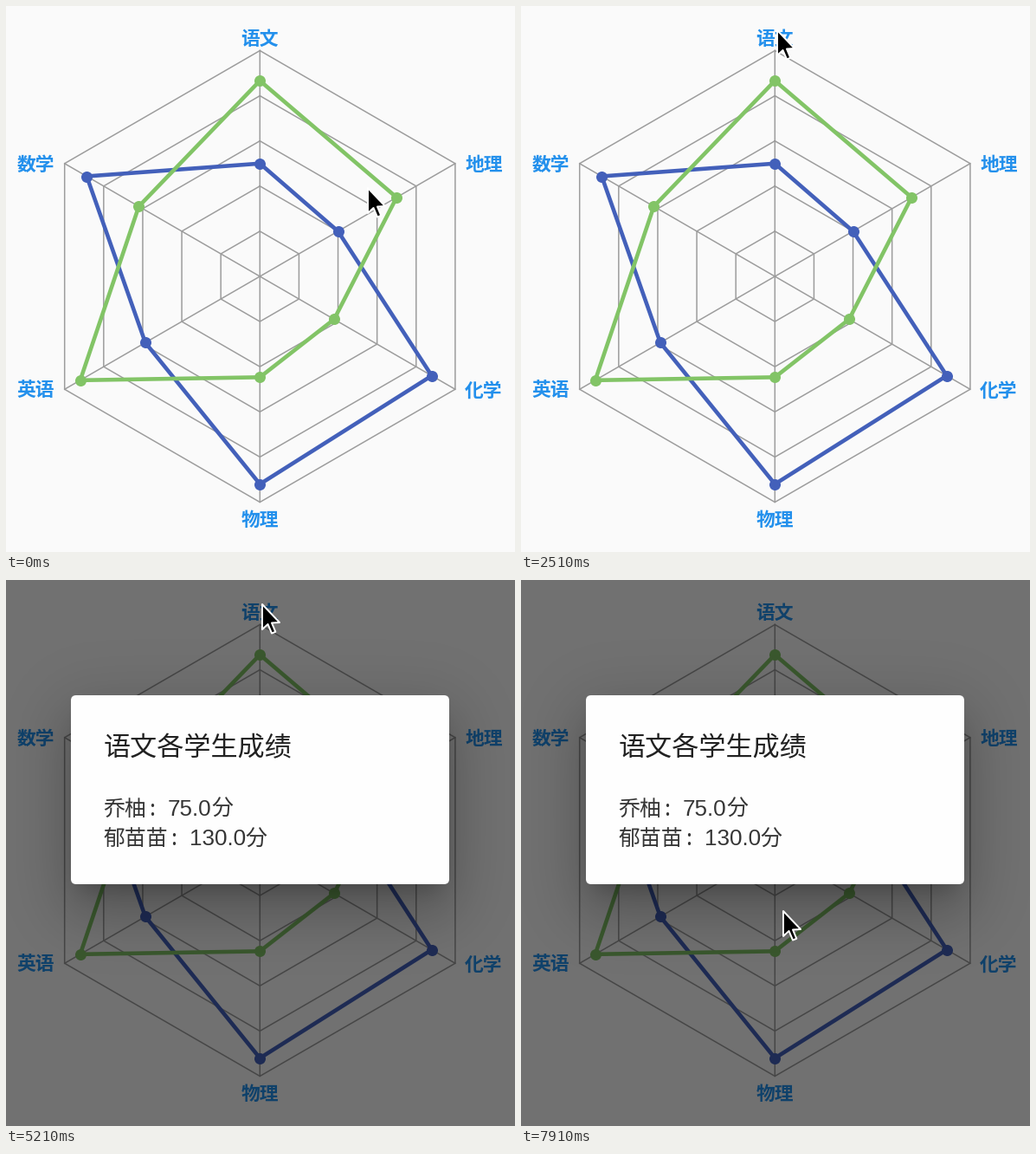
A matplotlib script that plays this animation: 588x630 px, repeating every 8000 ms.

```python
import math

import matplotlib.pyplot as plt
import numpy as np
from matplotlib.animation import FuncAnimation
from matplotlib.patches import FancyBboxPatch, Polygon, Rectangle

W, H, DPI = 588, 630, 100
STEP, LOOP = 50, 8000
PT = 72 / DPI
CJK = "Noto Sans CJK JP"

CX, CY, R, RINGS, FULL = 293.3, 312, 260.5, 5, 150
SUBJECTS = ["语文", "地理", "化学", "物理", "英语", "数学"]
LABEL_POS = [(293, 36.3), (552, 181.5), (552, 442),
             (293, 591.5), (34.5, 442), (34.5, 181.5)]
BLUE_SCORES = [75, 60, 132, 138, 88, 133]
GREEN_SCORES = [130, 105, 57, 67, 138, 93]

BACK, GRID, BLUE, GREEN, LABEL = ("#fafafa", "#9c9c9c", "#4360ba",
                                  "#82c466", "#2390ec")
TITLE, BODY = "#212121", "#353535"

DIALOG_AT = 4250
HOVER = (3310, 3730)
BOX = (75, 133, 512, 351)
SCALE = 1.555

# time, x, y of the pointer tip
PATH = [(0, 418, 210), (100, 418, 210), (850, 298, 33), (1700, 298, 33),
        (2200, 296, 28), (6200, 296, 28), (7100, 303, 382), (8000, 303, 382)]
ARROW = np.array([(0, 0), (0, 29), (6.5, 23), (11, 33.5),
                  (15.3, 31.8), (11, 21.5), (20, 21)])

fig = plt.figure(figsize=(W / DPI, H / DPI), dpi=DPI, facecolor=BACK)
ax = fig.add_axes([0, 0, 1, 1])
ax.axis("off")


def smooth(u):
    u = min(max(u, 0), 1)
    return u * u * (3 - 2 * u)


def spoke(i, frac):
    a = math.radians(60 * i)
    return CX + R * frac * math.sin(a), CY - R * frac * math.cos(a)


def line(points, color, width, **kw):
    xs, ys = zip(*points)
    ax.plot(xs, ys, color=color, lw=width * PT, solid_joinstyle="round",
            snap=False, **kw)


def series(scores, color, z):
    pts = [spoke(i, s / FULL) for i, s in enumerate(scores)]
    line(pts + pts[:1], color, 4.6, zorder=z)
    xs, ys = zip(*pts)
    ax.scatter(xs, ys, s=(13 * PT) ** 2, color=color, lw=0, snap=False,
               zorder=z)


def write(x, base, text, size, color, font=CJK, **kw):
    return ax.text(x, base, text, fontsize=size * PT, color=color,
                   family=font, va="baseline", **kw)


def blurred(lo, hi, sigma, n):
    edge = lambda p: math.erf(p / (sigma * math.sqrt(2)))
    return np.array([(edge(p + .5 - lo) - edge(p + .5 - hi)) / 2
                     for p in range(n)])


def shadow():
    x0, y0, x1, y1 = BOX
    clear = np.ones((H, W))
    for dy, blur, spread, alpha in [(11, 15, -7, .2), (24, 38, 3, .14),
                                    (9, 46, 8, .12)]:
        dy, s, sigma = dy * SCALE, spread * SCALE, blur * SCALE / 2
        rows = blurred(y0 + dy - s, y1 + dy + s, sigma, H)
        cols = blurred(x0 - s, x1 + s, sigma, W)
        clear *= 1 - alpha * np.outer(rows, cols)
    img = np.zeros((H, W, 4))
    img[..., 3] = 1 - clear
    return img


def chart():
    for k in range(1, RINGS + 1):
        line([spoke(i, k / RINGS) for i in range(7)], GRID, 1.5, zorder=1)
    for i in range(3):
        line([spoke(i, 1), spoke(i + 3, 1)], GRID, 1.5, zorder=1)
    series(BLUE_SCORES, BLUE, 2)
    series(GREEN_SCORES, GREEN, 3)
    for name, (x, y) in zip(SUBJECTS, LABEL_POS):
        write(x, y + 8.3, name, 21.8, LABEL, weight="bold", ha="center",
              zorder=4)


def dialog():
    x0, y0, x1, y1 = BOX
    parts = [
        ax.add_patch(Rectangle((0, 0), W, H, fc="black", alpha=.55, lw=0,
                               zorder=5)),
        ax.imshow(shadow(), extent=(0, W, H, 0), aspect="auto",
                  interpolation="nearest", zorder=5.5),
        ax.add_patch(FancyBboxPatch(
            (x0, y0), x1 - x0, y1 - y0,
            boxstyle="round,pad=0,rounding_size=6", fc="#fefefe", lw=0,
            zorder=6)),
        write(113, 203, "语文各学生成绩", 31.1, TITLE, zorder=7),
    ]
    for base, who, score, num_x, unit_x in [
            (272, "乔柚", "75.0", 187, 237.5),
            (306.5, "郁苗苗", "130.0", 211.5, 276)]:
        colon_x = 113 + 24.9 * len(who) + 2
        parts += [
            write(112.5, base, who, 24.9, BODY, zorder=7),
            write(colon_x, base, ":", 24.9, BODY, zorder=7),
            write(num_x, base, score, 26, BODY, "Liberation Sans", zorder=7),
            write(unit_x, base, "分", 24.9, BODY, zorder=7),
        ]
    return parts


chart()
hover = ax.add_patch(Rectangle((272, 20), 44, 33, fc="black", lw=0,
                               zorder=3.5))
popup = dialog()
pointer = ax.add_patch(Polygon(ARROW, closed=True, fc="black", ec="white",
                               lw=2 * PT, joinstyle="round", zorder=9))
ax.set_xlim(0, W)
ax.set_ylim(H, 0)


def tip(t):
    for (ta, xa, ya), (tb, xb, yb) in zip(PATH, PATH[1:]):
        if t < tb:
            u = smooth((t - ta) / (tb - ta))
            return xa + (xb - xa) * u, ya + (yb - ya) * u
    return PATH[-1][1:]


def draw(n):
    t = n * STEP
    is_open = t >= DIALOG_AT
    for part in popup:
        part.set_visible(is_open)
    hover.set_visible(not is_open)
    hover.set_alpha(.05 * smooth((t - HOVER[0]) / (HOVER[1] - HOVER[0])))
    pointer.set_xy(ARROW + tip(t))
    return []


anim = FuncAnimation(fig, draw, frames=LOOP // STEP, interval=STEP,
                     init_func=lambda: draw(0), repeat=True, repeat_delay=0,
                     blit=False)
plt.show()
```
